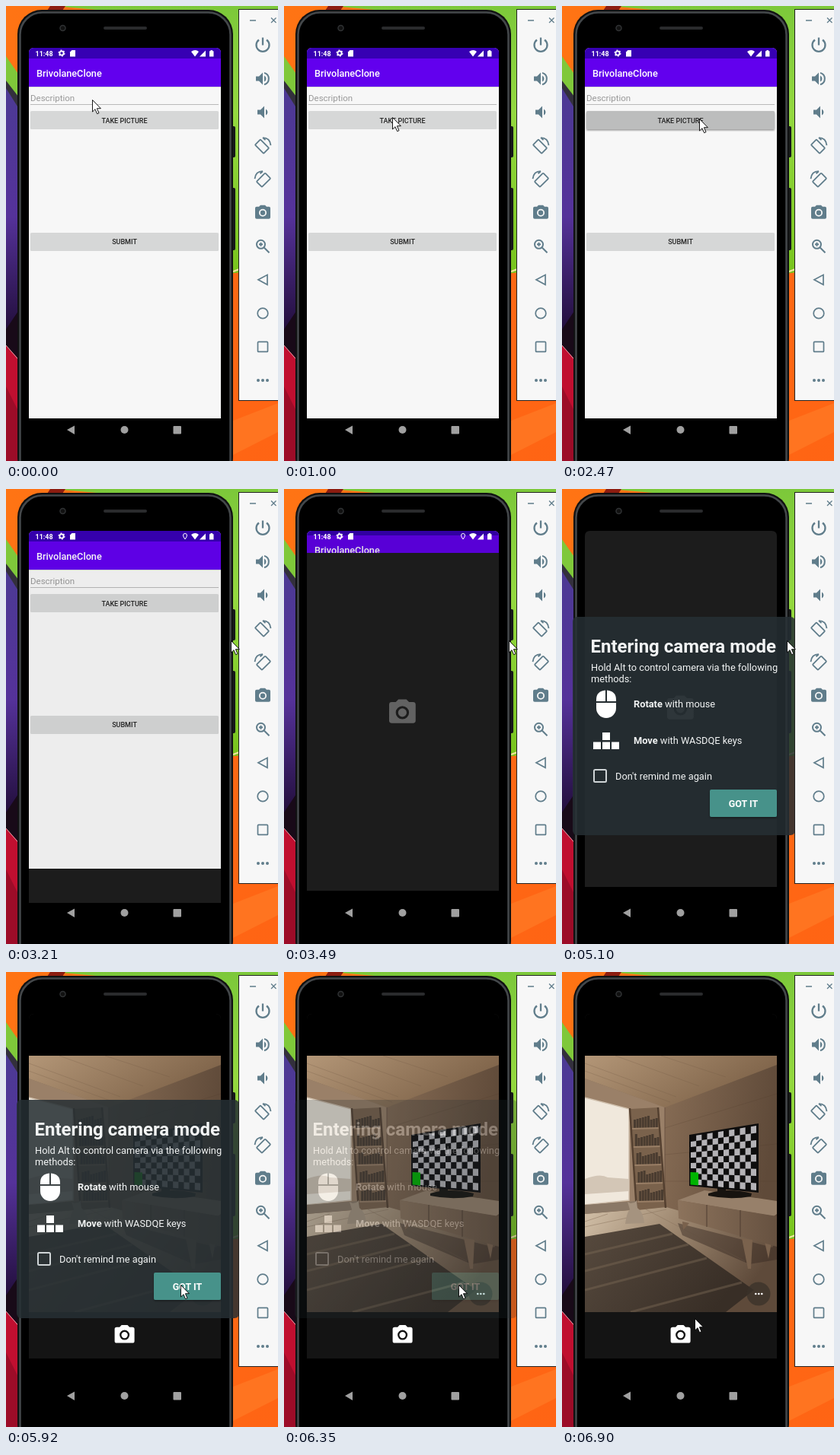
An HTML page for the animation above (8000 ms loop, 357 px wide and 598 px high).

```html
<!DOCTYPE html>
<html lang="en">
<head>
<meta charset="utf-8">
<title>Camera permission demo</title>
<style>
html, body { margin: 0; width: 100%; height: 100%; overflow: hidden; background: #000; }
svg { display: block; width: 357px; height: 598px; font-family: Roboto, Arial, sans-serif; }
.line { fill: none; stroke: #607d8b; stroke-width: 2; }
.btn { font-size: 9px; font-weight: 500; fill: #222; text-anchor: middle; }
</style>
</head>
<body>
<svg viewBox="0 0 357 598">
<defs>
  <linearGradient id="purple" x2="0" y2="1">
    <stop stop-color="#4c3a94"/><stop offset=".5" stop-color="#55329a"/><stop offset="1" stop-color="#1c0a30"/>
  </linearGradient>
  <linearGradient id="orange" x2="1" y2="1">
    <stop stop-color="#ff7414"/><stop offset="1" stop-color="#ff6414"/>
  </linearGradient>
  <linearGradient id="green" x2="0" y2="1">
    <stop stop-color="#7cc83a"/><stop offset=".4" stop-color="#94d840"/><stop offset="1" stop-color="#78c41e"/>
  </linearGradient>
  <linearGradient id="ceiling" x2="1" y2=".4">
    <stop stop-color="#b39677"/><stop offset="1" stop-color="#7d6248"/>
  </linearGradient>
  <linearGradient id="wall" x2="1" y2=".2">
    <stop stop-color="#8d735b"/><stop offset=".45" stop-color="#846a53"/><stop offset="1" stop-color="#5f4a39"/>
  </linearGradient>
  <linearGradient id="floor" x2="1" y2=".4">
    <stop stop-color="#d2c0a8"/><stop offset=".45" stop-color="#a08a72"/><stop offset="1" stop-color="#5e4a3a"/>
  </linearGradient>
  <linearGradient id="rug" x2="1" y2=".4">
    <stop stop-color="#574a3e"/><stop offset="1" stop-color="#382e26"/>
  </linearGradient>
  <linearGradient id="front" x2="1">
    <stop stop-color="#8c735c"/><stop offset="1" stop-color="#665140"/>
  </linearGradient>
  <filter id="shadow"><feDropShadow dx="0" dy="1.5" stdDeviation="1.2" flood-opacity=".4"/></filter>
  <clipPath id="screen"><path d="M30 544V62q0-7 7-7H275q7 0 7 7V544z"/></clipPath>
  <clipPath id="reveal"><rect id="revealBox" x="30" y="55" width="252" height="489"/></clipPath>
  <clipPath id="view"><rect x="30" y="110" width="252" height="337"/></clipPath>
  <path id="cam" fill-rule="evenodd" d="M9 2L7 4H4q-2 0-2 2v12q0 2 2 2h16q2 0 2-2V6q0-2-2-2h-3L15 2zM7 12a5 5 0 0 1 10 0a5 5 0 0 1-10 0zM8.8 12a3.2 3.2 0 0 0 6.4 0a3.2 3.2 0 0 0-6.4 0z"/>
  <g id="turn" class="line" style="stroke-width:1.800">
    <rect x="6" y="5" width="10" height="16" rx="1" transform="rotate(-45 11 13)"/>
    <path d="M12 1.500q9.500 0 10.500 10M12 1.500l3.500 3"/>
  </g>
</defs>

<!-- wallpaper -->
<rect width="357" height="598" fill="url(#orange)"/>
<path d="M62 0H357V345L290 352V20z" fill="url(#green)"/>
<path d="M58 0H78L70 12H50z" fill="#8c1c10"/>
<path d="M0 66L20 95V125H0z" fill="#7fc83a"/>
<path d="M0 98L20 124V150H0z" fill="#33303c"/>
<path d="M0 108L20 140V445H0z" fill="url(#purple)"/>
<path d="M0 425L20 395V470L0 448z" fill="#180a18"/>
<path d="M0 446L22 470V598H0z" fill="#c00f30"/>
<path d="M0 500L20 540V598H0z" fill="#9c0c28"/>
<path d="M0 446L20 469" stroke="#e4a0a8"/>
<path d="M298 349l8-3" stroke="#f4e6a0" stroke-width="2"/>
<path d="M298 545L357 522V560L298 590z" fill="#ff7420"/>

<!-- phone body -->
<rect x="296" y="158" width="5" height="41" rx="2" fill="#17181a"/>
<rect x="296" y="239" width="5" height="82" rx="2" fill="#17181a"/>
<rect x="15" y="5" width="283" height="620" rx="32" fill="#101112"/>
<rect x="18.500" y="8.500" width="276" height="620" rx="29" fill="#000" stroke="#44484b" stroke-width="2.500"/>
<rect x="128" y="27" width="57" height="4" rx="2" fill="#2a2b2d"/>
<circle cx="74.500" cy="29" r="3.500" fill="#111" stroke="#303234" stroke-width="1.500"/>

<g clip-path="url(#screen)">
  <g id="app">
    <path d="M30 40H282V542H30z" fill="#f7f7f7"/>
    <path d="M30 40H282V106H30z" fill="#6200ee"/>
    <path d="M30 40H282V69H30z" fill="#3700b3"/>
    <path d="M30 106.500H282" stroke="#d8d8d8"/>
    <text x="40" y="92.500" font-size="12.700" font-weight="500" fill="#fff">BrivolaneClone</text>
    <text x="32" y="124.500" font-size="11.500" fill="#999">Description</text>
    <path d="M32 129.500H279" stroke="#b9b9b9"/>
    <rect id="take" x="32" y="138" width="247" height="24" rx="1.500"/>
    <text class="btn" x="155.500" y="153.500">TAKE PICTURE</text>
    <rect x="32" y="298" width="247" height="24" rx="1.500" fill="#d6d7d7"/>
    <text class="btn" x="155.500" y="313">SUBMIT</text>
  </g>
  <rect id="dim" x="30" y="55" width="252" height="489"/>
  <g id="status" fill="#fff">
    <text x="38.500" y="65.500" font-size="9" font-weight="700">11:48</text>
    <circle cx="73" cy="62" r="2.600" fill="none" stroke="#fff" stroke-width="1.800"/>
    <circle cx="73" cy="62" r="3.900" fill="none" stroke="#fff" stroke-width="1.200" stroke-dasharray="2 2.080"/>
    <path d="M84 60.500L86.500 58H91V66.500H84z"/>
    <path d="M243 60q5.500-4 10 0l-5 6.500zM254 66.500h8V58.500zM267 59.200h1.500V58h2.500v1.200h1.500V66.500H267z"/>
    <path id="pin" fill="none" stroke="#fff" d="M235 66q-2.500-3.500-2.500-5a2.500 2.500 0 0 1 5 0q0 1.500-2.500 5z"/>
  </g>
  <g clip-path="url(#reveal)">
    <g id="splash">
      <rect x="30" y="55" width="252" height="489"/>
      <rect x="30" y="55" width="252" height="468" fill="#1c1c1c"/>
      <use href="#cam" fill="#626262" transform="translate(134.500 268) scale(1.740)"/>
    </g>
  </g>
  <g id="camera">
    <rect x="30" y="55" width="252" height="489"/>
    <rect x="30" y="447" width="252" height="61" fill="#141414"/>
    <g id="preview">
      <g clip-path="url(#view)">
        <rect x="30" y="110" width="252" height="337" fill="url(#wall)"/>
        <path d="M30 110H282V122L135 178L30 140z" fill="url(#ceiling)"/>
        <path d="M30 120L150 164M30 130L142 171M70 110L180 150M130 110L215 138" stroke="#6d5340" stroke-opacity=".25"/>
        <path d="M30 140L135 178V312H30z" fill="#9a8068"/>
        <path d="M30 165L88 180V300L30 306z" fill="#f0e8dc"/>
        <path d="M30 165L88 180V300L30 306" fill="none" stroke="#cfbfac" stroke-width="1.500"/>
        <path d="M30 272q20-8 30-2l28 2V288L30 292z" fill="#d3c6b6"/>
        <path d="M135 178V312" stroke="#6b5342"/>
        <path d="M135 205L282 160M135 240L282 226M135 275H282" stroke="#4a392c" stroke-opacity=".2"/>
        <path d="M30 318L137 309L282 350V447H30z" fill="url(#floor)"/>
        <path d="M30 335L137 312M110 312L240 380M60 318L30 328" stroke="#8a745e" stroke-opacity=".5"/>
        <path d="M30 306L98 301V312L30 318z" fill="#8a7866"/>
        <path d="M90 180L126 178L136 309L99 313z" fill="#7a624c"/>
        <path id="shelves"/>
        <path id="boards" stroke="#9a7f66" stroke-width="2"/>
        <path d="M89 179L98 313M126 178L136 310" stroke="#544030" stroke-width="2.500"/>
        <path d="M30 348L128 331L252 418L215 447H30z" fill="url(#rug)"/>
        <path d="M30 371L145 344M30 393L166 358M30 418L190 376M90 447L236 408" stroke="#7a6854" stroke-opacity=".45" stroke-width="3"/>
        <path d="M83 331q2-15 6-19l-3-10 4 2 5-1 3-3 1 10q8 6 9 20z" fill="#a5937f"/>
        <path d="M152 330L276 362L282 352V378L246 384L158 346z" fill="#33271f" opacity=".45"/>
        <path d="M158 328l1 11 8-9zM236 350l8 40 4 0 2-38zM266 355l5 22 4-22z" fill="#7a624d"/>
        <path d="M152 300L187 287L282 301V318L278 321z" fill="#97806a"/>
        <path d="M152 300L282 321V361L153 324z" fill="url(#front)"/>
        <path d="M190 306V335M234 313V348" stroke="#4f3d30"/>
        <path d="M192 291q25-8 57 0l-1 4q-28 5-56-1zM204 282h11v9h-11z" fill="#17130f"/>
        <path d="M167 214L258 199V290L167 281z" fill="#0e0d0d"/>
        <path id="checks" fill="#b4b2b6"/>
        <path d="M168.500 263L179 263.500V280.500L168.500 279.500z" fill="#00b400"/>
      </g>
      <circle cx="258" cy="423" r="15.500" fill="#3a312a" opacity=".75"/>
      <path d="M254.300 423h0M258.300 423h0M262.300 423h0" stroke="#fff" stroke-width="2.600" stroke-linecap="round"/>
      <use href="#cam" fill="#fff" transform="translate(140 461.500) scale(1.300)"/>
    </g>
  </g>
</g>

<g fill="#a0a0a0">
  <path d="M80 557L90 551.500V563z"/><circle cx="155.500" cy="557" r="5"/><rect x="219.500" y="552" width="10.500" height="10.500" rx="1"/>
</g>

<g id="dialog" fill="#fff" font-size="12.800">
  <rect x="14" y="168" width="292" height="287" rx="6" fill="#262f34" fill-opacity=".86"/>
  <g fill="#f2f4f4">
    <text x="37.500" y="215" font-size="24" font-weight="700">Entering camera mode</text>
    <text x="38" y="239">Hold Alt to control camera via the following</text>
    <text x="38" y="253.500">methods:</text>
    <text x="94" y="287"><tspan font-weight="700">Rotate</tspan> with mouse</text>
    <text x="94" y="335"><tspan font-weight="700">Move</tspan> with WASDQE keys</text>
    <text x="70" y="382">Don't remind me again</text>
  </g>
  <path d="M57 264.500V279H45V277Q45 265.500 57 264.500zM59 264.500V279H71V277Q71 265.500 59 264.500zM45 281H71V288a13 13 0 0 1-26 0z"/>
  <path d="M53 320h10v10h-10zM41 332.500h10v9.500h-10zM53 332.500h10v9.500h-10zM65 332.500h10v9.500h-10z"/>
  <rect x="42" y="369" width="16" height="16" rx="1.500" fill="none" stroke="#cfd4d6" stroke-width="2"/>
  <rect x="194" y="395" width="88" height="36" rx="2" fill="#46928a" filter="url(#shadow)"/>
  <text x="238" y="418" font-size="12.500" font-weight="700" text-anchor="middle">GOT IT</text>
</g>

<!-- emulator toolbar -->
<rect x="305.500" y="4.500" width="60" height="514" fill="#f7f7f7" stroke="#222"/>
<path d="M320 19h8M348 15.500l6.500 6.500M354.500 15.500l-6.500 6.500" class="line" style="stroke-width:1.300"/>
<g id="tools" fill="#607d8b">
  <path class="line" style="stroke-width:2.300" d="M12 2v10M7 5a8.500 8.500 0 1 0 10 0"/>
  <g><path d="M3 9v6h4l5 5V4L7 9zM14 8a4.500 4.500 0 0 1 0 8z"/><path class="line" d="M14 4.300a8 8 0 0 1 0 15.400"/></g>
  <path d="M5 9v6h4l5 5V4L9 9zM16 8a4.500 4.500 0 0 1 0 8z"/>
  <use href="#turn"/>
  <use href="#turn" transform="matrix(-1 0 0 1 24 0)"/>
  <use href="#cam"/>
  <path class="line" d="M4 9.500a5.500 5.500 0 0 1 11 0a5.500 5.500 0 0 1-11 0zM14 14l6.500 6.500M7 9.500h5M9.500 7v5"/>
  <path class="line" style="stroke-width:1.700" d="M6 12L18 5.500V18.500z"/>
  <circle class="line" style="stroke-width:1.700" cx="12" cy="12" r="6.800"/>
  <rect class="line" style="stroke-width:1.700" x="5.500" y="5.500" width="13" height="13" rx="1"/>
  <path d="M6 12h0M12 12h0M18 12h0" class="line" style="stroke-width:4;stroke-linecap:round"/>
</g>

<path id="cursor" d="M.5.5V16l3.500-3.300 2.600 6 2.400-1-2.600-6h5z" fill="#fff" stroke="#000" stroke-width=".9"/>
</svg>
<script>
const $ = id => document.getElementById(id);
const show = (id, on) => $(id).style.display = on ? '' : 'none';

// Each row: start time in ms, then the values held from there on.
const cursor = [[0, 113, 123], [140, 128, 141], [270, 139, 155], [430, 143, 156], [730, 143, 150],
  [850, 143, 146], [1000, 142, 146], [2470, 180, 148], [2620, 295, 199], [5550, 279, 252],
  [5670, 258, 325], [5800, 238, 385], [5920, 229, 411], [6770, 195, 440], [6900, 174, 455]];
const press = [[0, '#d6d7d7'], [1440, '#c6c7c7'], [2470, '#bcbdbd'], [2620, '#cfd0d0'], [2770, '#d6d7d7']];
// Reveal edge, splash offset, app offset, dim
const opening = [[0, 544, 21, 0, 0], [3210, 499, 21, 0, .04], [3340, 330, 17, -2, .07],
  [3490, 84, 5, -8, .1], [4710, 55, 0, -8, .1]];
const fade = [[0, 0], [4850, .3], [4975, .7], [5100, 1], [6220, .7], [6345, .3], [6470, 0]];
const at = (rows, t) => rows.findLast(row => row[0] <= t).slice(1);

[...$('tools').children].forEach((icon, i) => {
  const g = document.createElementNS('http://www.w3.org/2000/svg', 'g');
  g.setAttribute('transform', `translate(325 ${39.5 + i * 44.05})`);
  icon.replaceWith(g);
  g.append(icon);
});

// Perspective checkerboard on the television
let checks = '';
const cols = 12, rows = 9;
const spot = (c, r) => {
  const u = c / cols, v = r / rows, top = 216 - 14 * u, bottom = 279 + 8 * u;
  return `${169 + 86 * u} ${top + (bottom - top) * v}`;
};
for (let c = 0; c < cols; c++)
  for (let r = (c + 1) % 2; r < rows; r += 2)
    checks += `M${spot(c, r)}L${spot(c + 1, r)}L${spot(c + 1, r + 1)}L${spot(c, r + 1)}z`;
$('checks').setAttribute('d', checks);

let books = '', boards = '';
for (let i = 0; i < 5; i++) {
  const x = 92 + i * 1.8, y = 205 + i * 24;
  boards += `M${x - 1} ${y + 1}L${x + 37} ${y}`;
  for (let b = 0; b < 9; b++) {
    const height = 11 + (b * 7 + i * 5) % 6;
    books += `M${x + 2 + b * 3.6} ${y}v${-height}h3v${height}z`;
  }
}
$('shelves').setAttribute('d', books);
$('shelves').setAttribute('fill', '#4a3c30');
$('boards').setAttribute('d', boards);

function draw(now) {
  const t = now % 8000;
  const [x, y] = at(cursor, t);
  const [edge, slide, lift, dim] = at(opening, t);
  $('cursor').setAttribute('transform', `translate(${x} ${y})`);
  $('take').setAttribute('fill', at(press, t)[0]);
  $('take').setAttribute('filter', t >= 1440 && t < 2770 ? 'url(#shadow)' : 'none');
  $('app').setAttribute('transform', `translate(0 ${lift})`);
  $('dim').setAttribute('opacity', dim);
  $('revealBox').setAttribute('y', edge);
  $('splash').setAttribute('transform', `translate(0 ${slide})`);
  $('dialog').setAttribute('opacity', at(fade, t)[0]);
  show('app', t < 4710);
  show('status', t < 4710);
  show('pin', t >= 3060);
  show('splash', t >= 3210);
  show('camera', t >= 5250);
  show('preview', t >= 5400);
  requestAnimationFrame(draw);
}
draw(performance.now());
</script>
</body>
</html>
```
